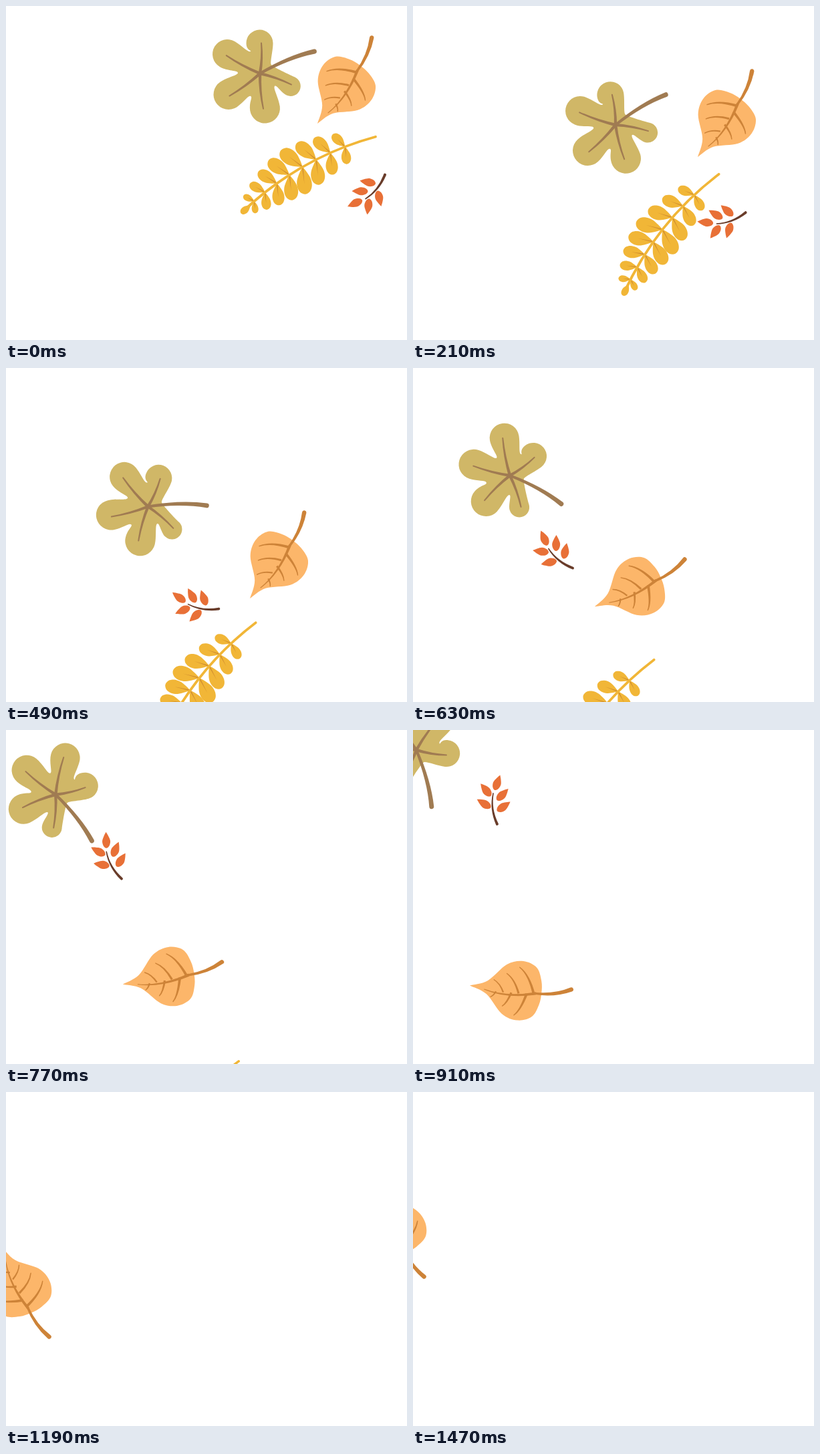
Write an HTML page that moves like this. It is 600 px wide and 500 px high and loops after 1540 ms.

```html
<!DOCTYPE html>
<html lang="en">
<head>
<meta charset="utf-8">
<title>Falling leaves</title>
<style>
  html, body { margin: 0; width: 100%; height: 100%; overflow: hidden; background: #fff; }
  svg { display: block; width: 100vw; height: 100vh; }
</style>
</head>
<body>
<svg id="stage" viewBox="0 0 600 500"></svg>
<script>
const LOOP = 1540, STEP = 70;
const TIMES = [0, 210, 490, 630, 910, 1190, 1470];
const stage = document.getElementById('stage');

const add = (p, d, k = 1) => [p[0] + d[0] * k, p[1] + d[1] * k];
const mid = (p, q) => [(p[0] + q[0]) / 2, (p[1] + q[1]) / 2];
const quarter = d => [-d[1], d[0]];
const toward = (p, q) => {
  const len = Math.hypot(q[0] - p[0], q[1] - p[1]);
  return [(q[0] - p[0]) / len, (q[1] - p[1]) / len];
};
const bezier = (a, c, b, t) => [0, 1].map(k =>
  (1 - t) ** 2 * a[k] + 2 * t * (1 - t) * c[k] + t * t * b[k]);
const pt = p => p[0].toFixed(2) + ',' + p[1].toFixed(2);
const path = (d, fill) => `<path d="${d}" fill="${fill}"/>`;
const place = (p, turn, art) =>
  `<g transform="translate(${pt(p)}) rotate(${turn.toFixed(2)})">${art}</g>`;

// Curved stroke from a to b, width w0 to w1, with a round end.
function taper(fill, a, c, b, w0, w1) {
  const na = quarter(toward(a, c)), nb = quarter(toward(c, b)), nc = quarter(toward(a, b));
  const edge = s => [add(a, na, s * w0 / 2), add(c, nc, s * (w0 + w1) / 4), add(b, nb, s * w1 / 2)].map(pt);
  const [a0, c0, b0] = edge(1), [a1, c1, b1] = edge(-1), r = w1 / 2;
  return path(`M${a0}Q${c0} ${b0}A${r},${r} 0 0 0 ${b1}Q${c1} ${a1}Z`, fill);
}

// Smooth outline, pointed at the origin, from one half mirrored on the x axis.
function petal(fill, half, len, w) {
  const back = half.slice(0, -1).reverse().map(([x, y]) => [x, -y]);
  const dots = [...half, ...back].map(([x, y]) => [x * len, y * w]);
  const at = i => dots[Math.min(Math.max(i, 0), dots.length - 1)];
  const pull = (i, s) => pt(add(at(i), add(at(i + 1), at(i - 1), -1), s / 6));
  let d = 'M' + pt(at(0));
  for (let i = 1; i < dots.length; i++) d += `C${pull(i - 1, 1)} ${pull(i, -1)} ${pt(at(i))}`;
  return path(d + 'Z', fill);
}

function greenLeaf() {
  const vein = '#a07b52', heart = [380, 101];
  // Clockwise: round lobe ends (x, y, radius) and the notch before each lobe.
  const lobes = [[331, 72, 22], [379.5, 55.5, 20], [426, 120, 15], [387.5, 153.5, 22.5], [333, 132.5, 22.5]];
  const notches = [[347, 100], [365.5, 68], [397, 88], [402, 120], [366, 135]];
  let d = 'M' + pt(notches[0]), veins = '';
  lobes.forEach(([x, y, r], i) => {
    const end = [x, y], from = notches[i], to = notches[(i + 1) % lobes.length];
    const out = toward(heart, end), side = quarter(out);
    const left = add(end, side, -r), right = add(end, side, r);
    const round = (p, k) => pt(add(p, quarter(toward(heart, p)), k));
    d += `C${round(from, 4)} ${pt(add(left, out, -r * .6))} ${pt(left)}` +
      `A${r},${r} 0 0 1 ${pt(right)}` +
      `C${pt(add(right, out, -r * .6))} ${round(to, -4)} ${pt(to)}`;
    const bend = i % 2 ? 1 : -1, tip = add(end, side, bend * 2.5);
    veins += taper(vein, heart, add(mid(heart, tip), side, bend * 3), tip, 4.5, 2);
  });
  return path(d + 'Z', '#d0b767') + veins + taper(vein, heart, [424, 76], [461.5, 68], 4, 7);
}

function orangeLeaf() {
  const vein = '#cd8338';
  const half = [[0, 0], [26, 10], [52, 37], [76, 44.5], [97, 37], [106, 18], [108, 0]];
  let art = place([0, 0], -1, petal('#fcb66a', half, 1, 1));
  for (let i = 0; i < 3; i++) {
    for (const side of [-1, 1]) {
      const left = side < 0;
      const base = [(left ? 97 : 86) - 23 * i, 2 + i];
      const back = left ? 26 - 5 * i : 15 - 4 * i, reach = side * (36 - 11.5 * i) - base[1];
      art += taper(vein, base, add(base, [-back * .4, reach * .75]), add(base, [-back, reach]), 4 - i * .8, 1.4);
    }
  }
  art += taper(vein, [22, 3], [56, 12], [99, 0], 1, 4.2) +
    taper(vein, [98, 0], [128, 0], [151.5, -12.5], 3.4, 6.4);
  return place([466, 176], -53, art);
}

function yellowLeaf() {
  const fill = '#f1b637', axis = [[354, 308], [440, 226.5], [553, 195.7]];
  const half = [[0, 0], [.2, .24], [.45, .46], [.7, .5], [.91, .34], [1, 0]];
  const leaflet = (p, turn, len) => place(p, turn,
    petal(fill, half, len, len * .54) + path(`M2,-.8L${len * .62},0L2,.8Z`, '#cf8b30'));
  let art = leaflet([366, 298], 139, 19);
  for (let i = 0; i < 8; i++) {
    const base = bezier(...axis, .1 + .693 * (i / 7) ** 1.05);
    const len = 41 - 2.85 * Math.abs(i - 4) ** 1.5;
    art += leaflet(base, 207 + 2.5 * i, len) + leaflet(base, 84, len);
  }
  return art + taper(fill, ...axis, 4, 3.6);
}

function redSprig() {
  const half = [[0, 0], [.25, .28], [.56, .5], [.86, .36], [1, 0]];
  // Drawn from the pointed tip back to the base.
  const leaflet = (p, turn) => place(p, turn,
    `<g transform="translate(24 0) scale(-1 1)">${petal('#e87037', half, 24, 12)}</g>`);
  let art = leaflet([533, 290.5], 156);
  for (let i = 0; i < 2; i++) {
    art += leaflet([541.5 + 11.5 * i, 277.5 - 11.5 * i], 181 + 10 * i) +
      leaflet([543.5 + 12.5 * i, 288.5 - 12 * i], 97 - 20 * i);
  }
  return art + taper('#693c2a', [537.5, 289], [558, 276], [567, 252.5], 1.5, 4);
}

// Poses at TIMES: x, y, turn in degrees. The first one is also the pivot.
const leaves = [
  { art: greenLeaf(), keys: [[380, 101, 0], [303, 178, -9], [212.5, 207.5, 21],
    [145, 161, 51], [5, 30, 97], [-120, -95, 140]] },
  { art: orangeLeaf(), keys: [[510, 121, 0], [470, 171, 0], [409, 290, 0],
    [337.5, 331.5, 30], [154.5, 393, 60], [19.5, 297.5, 120], [-28.5, 207.5, 120]] },
  { art: yellowLeaf(), keys: [[454, 252, 0], [387, 341, -22], [303, 470.5, -22],
    [290, 526, -22], [265, 645, -22]] },
  { art: redSprig(), keys: [[540, 284, 0], [458.5, 323, 30], [277.5, 353, 60],
    [207.5, 272.5, 90], [122, 99.5, 134], [175, -62, 182]] }
];

for (const leaf of leaves) {
  leaf.node = document.createElementNS('http://www.w3.org/2000/svg', 'g');
  leaf.node.innerHTML = leaf.art;
  stage.appendChild(leaf.node);
}

// Slope of one coordinate at key i.
function slope(keys, i, axis) {
  const a = Math.max(i - 1, 0), b = Math.min(i + 1, keys.length - 1);
  return (keys[b][axis] - keys[a][axis]) / (TIMES[b] - TIMES[a]);
}

// Smooth path through the keys, even turning between them.
function pose(keys, t) {
  const last = keys.length - 1;
  if (t >= TIMES[last]) return keys[last];
  let i = 0;
  while (t >= TIMES[i + 1]) i++;
  const span = TIMES[i + 1] - TIMES[i], u = (t - TIMES[i]) / span;
  const glide = axis => {
    const p = keys[i][axis], q = keys[i + 1][axis];
    const m = slope(keys, i, axis) * span, n = slope(keys, i + 1, axis) * span;
    return p + u * (m + u * (3 * (q - p) - 2 * m - n + u * (2 * (p - q) + m + n)));
  };
  return [glide(0), glide(1), keys[i][2] + (keys[i + 1][2] - keys[i][2]) * u];
}

function render(ms) {
  const t = Math.floor(ms % LOOP / STEP) * STEP;
  for (const { node, keys } of leaves) {
    const [x, y, turn] = pose(keys, t), [px, py] = keys[0];
    node.setAttribute('transform',
      `translate(${pt([x, y])}) rotate(${turn.toFixed(2)}) translate(${-px} ${-py})`);
  }
}

let start;
function tick(now) {
  start ??= now;
  render(Math.max(0, now - start));
  requestAnimationFrame(tick);
}
render(0);
requestAnimationFrame(tick);
</script>
</body>
</html>
```
